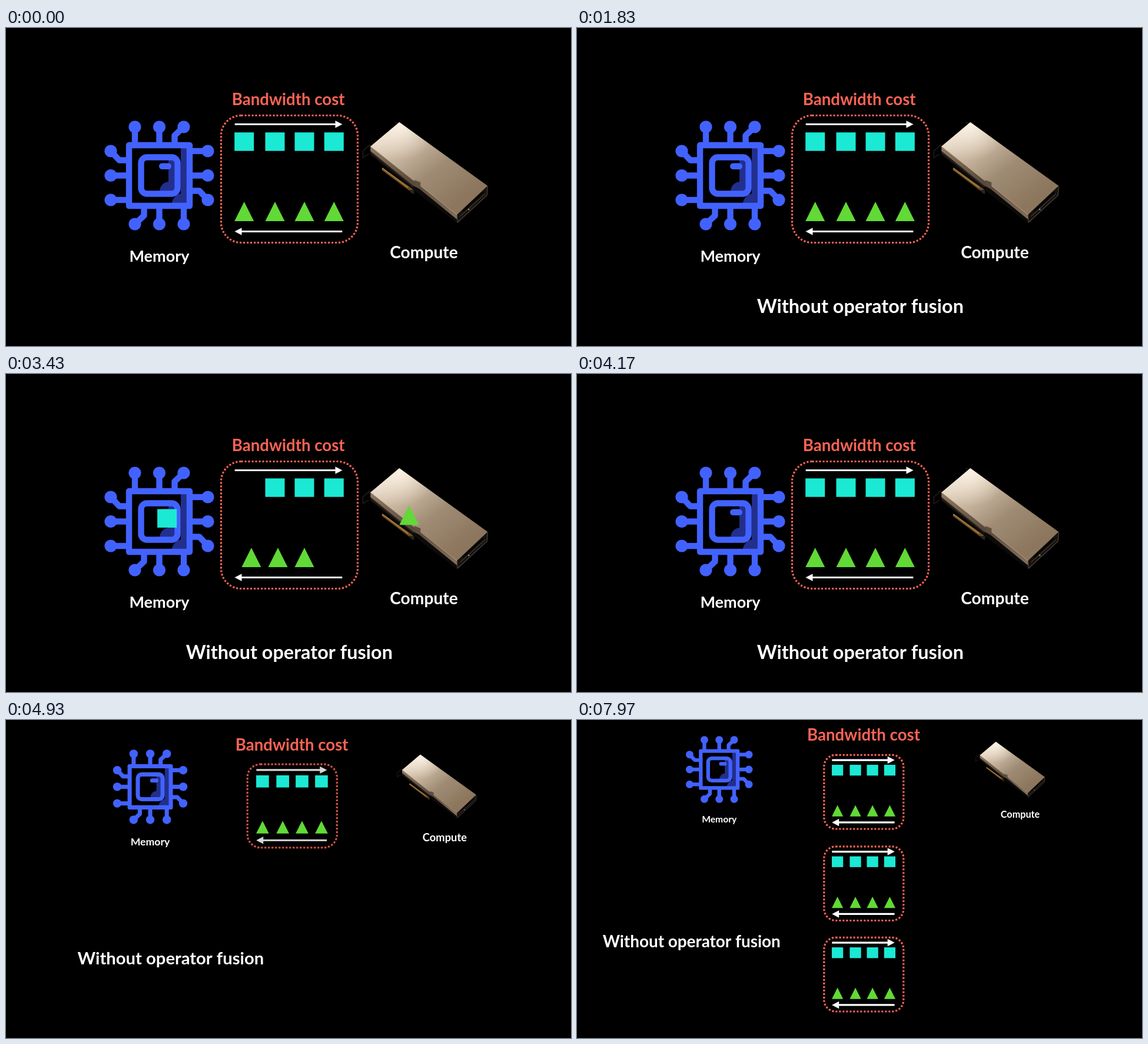
An HTML page with a canvas for the animation above (8 s loop, 960 px wide and 540 px high).

```html
<!DOCTYPE html>
<html lang="en">
<head>
<meta charset="utf-8">
<title>Bandwidth cost</title>
<style>
html, body { margin: 0; width: 100%; height: 100%; overflow: hidden; background: #000; }
canvas { display: block; width: 960px; height: 540px; }
</style>
</head>
<body>
<canvas id="stage" width="960" height="540"></canvas>
<script>
const ctx = document.getElementById('stage').getContext('2d');
const LOOP = 8000;
const BLUE = '#4262ff', SHADE = '#222f8c', CORAL = '#fb6454', TEAL = '#1be9d4', GREEN = '#61d936', WHITE = '#fff';
const FONT = 'Lato, "Open Sans", sans-serif';

const lerp = (a, b, p) => a + (b - a) * p;
const span = (t, a, b) => Math.min(1, Math.max(0, (t - a) / (b - a)));
const ease = p => (1 - Math.cos(Math.PI * p)) / 2;
const glide = (t, a, b) => ease(span(t, a, b));
const settle = (u, k) => 1 - Math.pow(1 - u * u, k);

// Runs draw with an origin, scale and opacity of its own
function place(x, y, scale, alpha, draw) {
  if (alpha <= 0) return;
  ctx.save();
  ctx.globalAlpha *= alpha;
  ctx.translate(x, y);
  ctx.scale(scale, scale);
  draw();
  ctx.restore();
}

function poly(fill, ...pts) {
  ctx.fillStyle = fill;
  ctx.beginPath();
  for (let i = 0; i < pts.length; i += 2) ctx.lineTo(pts[i], pts[i + 1]);
  ctx.closePath();
  ctx.fill();
}

function stroke(color, width, ...pts) {
  ctx.strokeStyle = color;
  ctx.lineWidth = width;
  ctx.beginPath();
  for (let i = 0; i < pts.length; i += 2) ctx.lineTo(pts[i], pts[i + 1]);
  ctx.stroke();
}

function disc(color, x, y, r) {
  ctx.fillStyle = color;
  ctx.beginPath();
  ctx.arc(x, y, r, 0, 7);
  ctx.fill();
}

function label(text, x, y, size, color, scale = 1, alpha = 1) {
  place(x, y, scale, alpha, () => {
    ctx.font = `700 ${size}px ${FONT}`;
    ctx.textAlign = 'center';
    ctx.fillStyle = color;
    ctx.fillText(text, 0, 0);
  });
}

function chip() {
  const clipShade = (x, y, w, h, draw) => {
    ctx.save();
    ctx.beginPath();
    ctx.rect(x, y, w, h);
    ctx.clip();
    draw();
    ctx.restore();
  };
  clipShade(-47, -47, 94, 94, () => {
    ctx.fillStyle = SHADE;
    ctx.fillRect(36.5, -47, 12, 94);
    disc(SHADE, 41, 50, 20);
  });
  ctx.fillStyle = '#000';
  ctx.fillRect(-30, -30, 60, 60);
  clipShade(-27, -27, 54, 54, () => {
    ctx.fillStyle = SHADE;
    ctx.fillRect(15.5, -27, 12, 54);
    disc(SHADE, 17, 27, 16.5);
  });
  ctx.lineJoin = 'round';
  ctx.strokeStyle = BLUE;
  ctx.lineWidth = 10.4;
  ctx.strokeRect(-51.5, -51.5, 103, 103);
  ctx.beginPath();
  ctx.roundRect(-31, -31, 62, 62, 10);
  ctx.stroke();
  ctx.fillStyle = BLUE;
  ctx.beginPath();
  ctx.roundRect(-.5, -21, 21, 10.4, 5.2);
  ctx.fill();
  for (let side = 0; side < 4; side++) {
    for (const x of [-41.5, 0, 41.5]) disc(BLUE, x, -82.5, 10.6);
    stroke(BLUE, 10.4, -41.5, -82, -41.5, -52);
    stroke(BLUE, 10.4, 0, -82, 0, -52);
    stroke(BLUE, 10.4, 41.5, -82.5, 26, -68, 26, -52);
    ctx.rotate(Math.PI / 2);
  }
}

// Origin is the top corner of the card
function card() {
  stroke('#1b1917', 2, -8, 0, 0, 3);
  stroke('#191817', 2, -50, 38, -62, 49, -62, 60, -52, 54);
  poly('#0c0b0a', -49, 42, 98, 157, 98, 171, 24, 115, -49, 56);
  poly('#24201b', -49, 41, 24, 98, 24, 111, -49, 53);
  const side = ctx.createLinearGradient(-49, 41, 98, 165);
  side.addColorStop(0, '#8f785f');
  side.addColorStop(.5, '#58483a');
  side.addColorStop(1, '#84705a');
  poly(side, -49, 40, 98, 156, 98, 165, 34, 113, 24, 108, -49, 49);
  poly('#6e4c22', -29, 77, 22, 113, 25, 119, 18, 117, -30, 81);
  stroke('#a87c3c', 2, -29, 78, 15, 111);
  poly('#292521', 17, 115, 25, 115, 25, 122, 20, 120);
  poly('#15120f', 98, 156, 150, 108, 149, 123, 99, 171);
  stroke('#51473b', 1.2, 98, 157, 99, 170, 149, 124, 150, 109);
  stroke('#3b342d', 1.5, 103, 160, 146, 121);
  stroke('#080706', 4, 108, 151, 143, 119);
  disc('#aa9679', 118, 148, 1.3);
  const top = ctx.createLinearGradient(-8, 5, 95, 140);
  top.addColorStop(0, '#ecdfcf');
  top.addColorStop(.25, '#cbb9a3');
  top.addColorStop(.6, '#9f8b74');
  top.addColorStop(1, '#8c765d');
  poly(top, 0, 0, 150, 108, 98, 157, -49, 41);
  const glow = ctx.createRadialGradient(2, 3, 0, 2, 3, 62);
  glow.addColorStop(0, 'rgba(255,247,236,.8)');
  glow.addColorStop(1, 'rgba(255,242,225,0)');
  poly(glow, 0, 0, 150, 108, 98, 157, -49, 41);
  stroke('#bfa98d', .8, -49, 41, 98, 157);
  poly('#5e4e3d', 25, 98, 36, 102, 36, 113, 28, 108);
}

function square(x, y, alpha = 1) {
  place(x, y, 1, alpha, () => {
    ctx.fillStyle = TEAL;
    ctx.fillRect(-16.5, -15.7, 33, 31.4);
  });
}

function triangle(x, y, alpha = 1) {
  place(x, y, 1, alpha, () => poly(GREEN, 0, -16.5, 16.5, 16.5, -16.5, 16.5));
}

const ROW = [404.7, 457, 507, 557.3], PACKED = [418.5, 462.7, 507];
const SQ_Y = 193, TRI_Y = 311.5;
const MEM = [256.5, 252], GPU = [701.5, 230.5];

// Times: leave, arrive, swapped, return, done
const CYCLES = [[20, 700, 860, 890, 1680], [1850, 2520, 3130, 3250, 4070]];

function items(t) {
  const c = CYCLES.find(c => t >= c[0] && t < c[4]);
  if (!c) {
    ROW.forEach(x => { square(x, SQ_Y); triangle(x, TRI_Y); });
  } else if (t < c[3]) {
    const p = glide(t, c[0], c[1]), q = span(t, c[1], c[2]);
    for (let i = 0; i < 3; i++) {
      square(lerp(ROW[i], ROW[i + 1], p), SQ_Y);
      triangle(lerp(ROW[i + 1], PACKED[i], p), TRI_Y);
    }
    square(lerp(ROW[3], GPU[0], p), lerp(SQ_Y, GPU[1], p), 1 - q);
    triangle(lerp(ROW[0], MEM[0], p), lerp(TRI_Y, MEM[1], p), 1 - q);
    square(...MEM, q);
    triangle(...GPU, q);
  } else {
    const p = glide(t, c[3], c[4]);
    for (let i = 0; i < 3; i++) {
      square(ROW[i + 1], SQ_Y);
      triangle(lerp(PACKED[i], ROW[i], p), TRI_Y);
    }
    square(lerp(MEM[0], ROW[0], p), lerp(MEM[1], SQ_Y, p));
    triangle(lerp(GPU[0], ROW[3], p), lerp(GPU[1], TRI_Y, p));
  }
}

// Dotted frame and arrows; k is the pen size within the scaled panel
function outline(k, alpha) {
  place(0, 0, 1, alpha, () => {
    ctx.strokeStyle = CORAL;
    ctx.lineWidth = 3.2 * k;
    ctx.setLineDash([3.1 * k, 2.9 * k]);
    ctx.beginPath();
    ctx.roundRect(365.5, 148.5, 232, 216, 34);
    ctx.stroke();
    ctx.setLineDash([]);
    const h = 12 * k, w = 6.2 * k;
    stroke(WHITE, 3.2 * k, 388.7, 163.5, 572 - h, 163.5);
    poly(WHITE, 571.5, 163.5, 571.5 - h, 163.5 - w, 571.5 - h, 163.5 + w);
    stroke(WHITE, 3.2 * k, 571.3, 345.5, 388 + h, 345.5);
    poly(WHITE, 388.5, 345.5, 388.5 + h, 345.5 - w, 388.5 + h, 345.5 + w);
  });
}

function panel(t, p, dy, alpha) {
  const s = lerp(1, .582, p);
  place(lerp(481, 487, p), lerp(254.5, 121, p) + dy, s, alpha, () => {
    ctx.translate(-481, -254.5);
    outline(1, 1 - p);
    outline(1 / s, p);
    items(t);
  });
}

const bez = (a, b, c, d, u) => {
  const v = 1 - u;
  return v * v * v * a + 3 * v * v * u * b + 3 * v * u * u * c + u * u * u * d;
};

function bow(y, p, alpha) {
  if (p <= 0) return;
  place(0, y, 1, alpha, () => {
    const at = u => [bez(557, 584, 590, 565, u), bez(0, 45, 95, 143, u)];
    const pts = [];
    for (let i = 0; i <= 40; i++) pts.push(...at(p * i / 40));
    stroke(WHITE, 2.8, ...pts);
    const [x, yy] = at(p), [px, py] = at(p - .03);
    ctx.translate(x, yy);
    ctx.rotate(Math.atan2(yy - py, x - px));
    poly(WHITE, 9, 0, -2, -5.6, -2, 5.6);
  });
}

function render(t) {
  ctx.fillStyle = '#000';
  ctx.fillRect(0, 0, 960, 540);
  const u = span(t, 4660, 5117);
  const p = settle(u, 4), c = settle(u, 2.8);

  place(lerp(260.5, 241.7, p), lerp(250.5, 84, p), lerp(1, .61, p), 1, chip);
  place(lerp(668.3, 711.7, p), lerp(160, 37, p), lerp(1, .554, p), 1, card);
  label('Memory', lerp(260.5, 241.7, p), lerp(396.5, 173.5, p), 27, WHITE, lerp(1, .58, p));
  label('Compute', lerp(710, 753, p), lerp(391, 165.7, p), 28.2, WHITE, lerp(1, .575, p));
  label('Bandwidth cost', lerp(479.7, 487, p), lerp(130.5, 35, p), 27.6, CORAL);
  label('Without operator fusion', lerp(481.3, 194.7, c), lerp(483.5, 385.5, c), 32.4, WHITE,
    lerp(1, .86, c), glide(t, 30, 700));

  panel(t, p, 0, 1);
  panel(t, p, 155.5, glide(t, 5450, 5780));
  panel(t, p, 310, glide(t, 6230, 6600));
  const fade = 1 - span(t, 6810, 7030);
  bow(125, glide(t, 5150, 5500), fade);
  bow(291, glide(t, 5820, 6220), fade);
}

function frame(now) {
  render(now % LOOP);
  requestAnimationFrame(frame);
}
requestAnimationFrame(frame);
</script>
</body>
</html>
```
